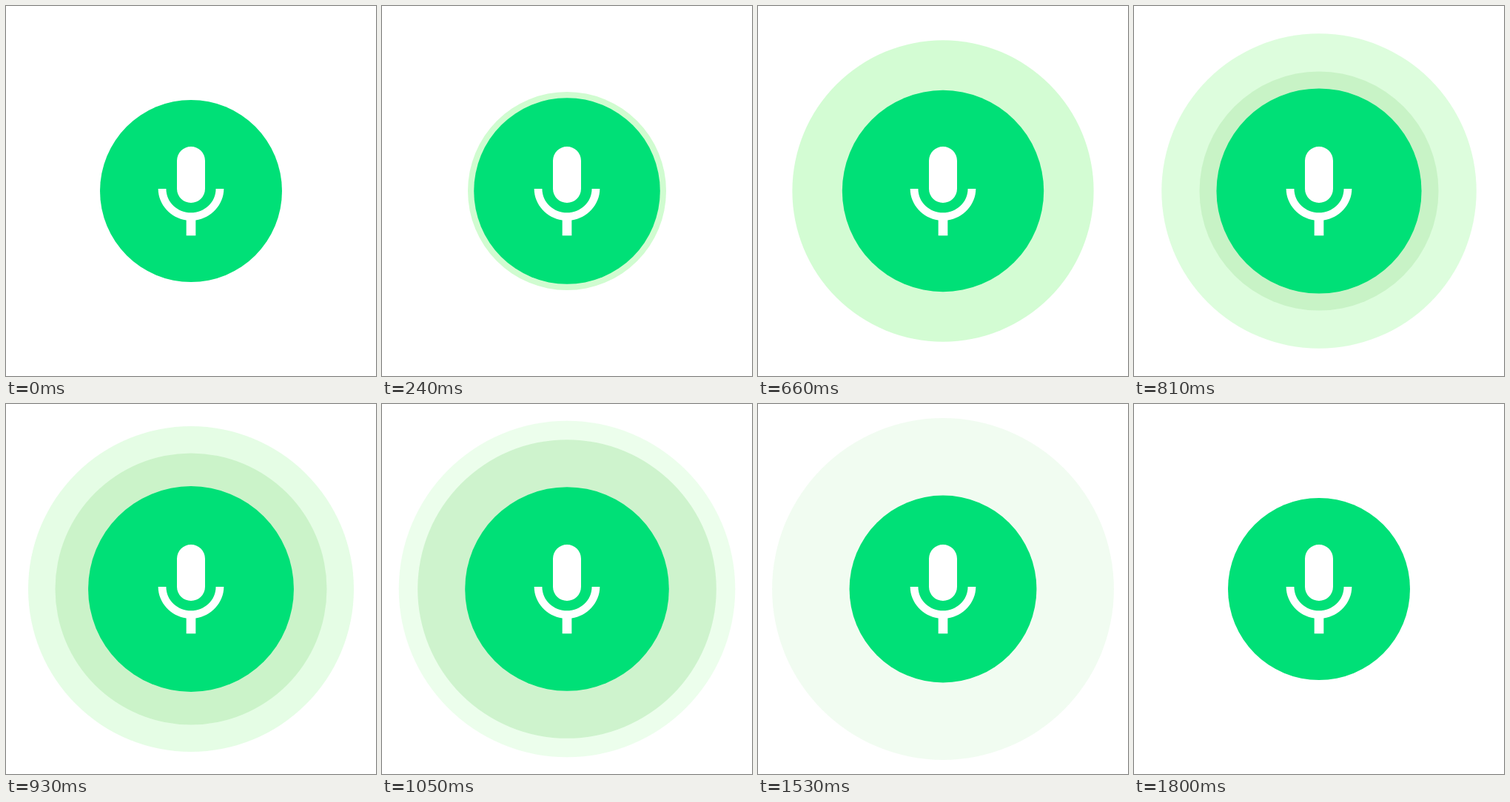
Animation, 500 px wide and 500 px high, one loop 1.83 s. Source, as an HTML page:

```html
<!DOCTYPE html>
<html lang="en">
<head>
<meta charset="utf-8">
<title>Voice pulse</title>
<style>
  html, body { margin: 0; width: 100%; height: 100%; overflow: hidden; background: #fff; }
  svg { display: block; width: 100%; height: 100%; }
</style>
</head>
<body>
<svg viewBox="0 0 500 500">
  <circle id="first" cx="250" cy="250" fill="#d0fcd0"/>
  <circle id="second" cx="250" cy="250" fill="#bbedb9"/>
  <circle id="button" cx="250" cy="250" r="123" fill="#00e077"/>
  <path fill="#fff" transform="translate(174 177.33) scale(6.333)"
    d="M12 14a3 3 0 0 0 3-3V5a3 3 0 0 0-6 0v6a3 3 0 0 0 3 3z
       M17.3 11c0 3-2.54 5.1-5.3 5.1S6.7 14 6.7 11H5c0 3.41 2.72 6.23 6 6.72V21h2v-3.28c3.28-.48 6-3.3 6-6.72z"/>
</svg>
<script>
  const STEP = 30, STEPS = 61;
  const [first, second, button] = ['first', 'second', 'button'].map(id => document.getElementById(id));
  const smooth = x => x * x * (3 - 2 * x);

  // A ring grows quickly for 20 steps, then slowly while it fades out.
  function drawRing(ring, age, alpha) {
    const visible = age >= 0 && age < 45;
    const late = Math.max(0, age - 20);
    ring.setAttribute('r', visible ? 90 + 5.5 * Math.min(age, 20) + 1.82 * late : 0);
    ring.setAttribute('opacity', visible ? alpha * (1 - late / 25) : 0);
  }

  function draw(now) {
    const step = Math.floor(now / STEP) % STEPS;
    drawRing(first, step, 1);
    drawRing(second, step - 14, 0.62);
    button.setAttribute('r', 123 + 16 * smooth(1 - Math.abs(step - 30) / 30));
  }

  const start = performance.now();
  function tick() {
    draw(performance.now() - start);
    requestAnimationFrame(tick);
  }
  tick();
</script>
</body>
</html>
```
